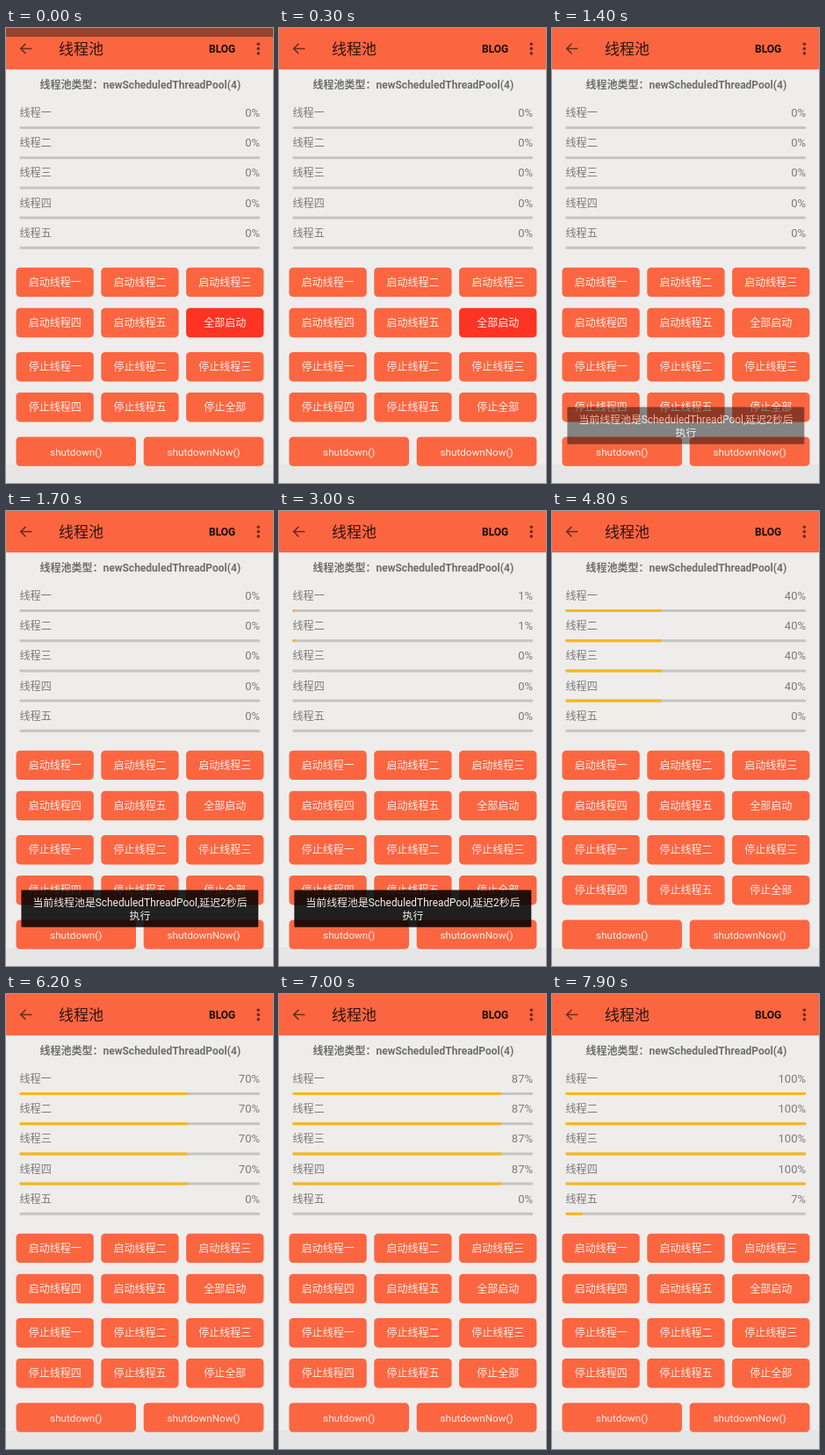
An HTML page for the animation above (8000 ms loop, 304 by 518 pixels).

```html
<!DOCTYPE html>
<html lang="zh-CN">
<head>
<meta charset="utf-8">
<style>
html, body { margin: 0; width: 100%; height: 100%; overflow: hidden; background: #eeedec; }
svg { display: block; width: 304px; height: 518px; font: 12.1px Roboto, 'Noto Sans CJK SC', 'Noto Sans CJK', sans-serif; }
.middle { text-anchor: middle; }
.bold { font-weight: 700; font-size: 12px; }
</style>
</head>
<body>
<svg id="stage" viewBox="0 0 304 518"></svg>
<script>
const LOOP = 8000, STEP = 100;
const ORANGE = '#fb6641', GREY = '#7b7b7a';
const stage = document.getElementById('stage');

function add(tag, attrs, parent = stage) {
  const el = document.createElementNS('http://www.w3.org/2000/svg', tag);
  for (const key in attrs) el.setAttribute(key, attrs[key]);
  parent.appendChild(el);
  return el;
}
const rect = (x, y, width, height, fill, rx = 0, parent) =>
  add('rect', { x, y, width, height, fill, rx }, parent);
function text(str, x, y, fill, attrs, parent) {
  const el = add('text', { x, y, fill, ...attrs }, parent);
  el.textContent = str;
  return el;
}
function button(label, x, y, width, size = 12) {
  const box = rect(x, y, width, 33.4, ORANGE, 4.5);
  text(label, x + width / 2, y + 21.4, '#ffeee8', { class: 'middle', 'font-size': size });
  return box;
}

// Background and header
rect(0, 0, 304, 518, '#eeedec');
rect(0, 497, 304, 21, '#e6e6e6');
rect(0, 0, 304, 47.2, ORANGE);
const statusShade = rect(0, 0, 304, 10, '#93442d');
add('path', { d: 'M29.5 23.5H17M22.5 17.7L16.7 23.5L22.5 29.3', fill: 'none', stroke: '#6a2d1e', 'stroke-width': 1.6 });
text('线程池', 60, 30, '#30150e', { 'font-size': 17 });
text('BLOG', 231, 28, '#1c0c08', { class: 'bold' });
for (const cy of [18.3, 23.6, 28.9]) add('circle', { cx: 287.3, cy, r: 1.8, fill: '#6a2d1e' });

text('线程池类型：newScheduledThreadPool(4)', 152.8, 69, '#6f6f6f', { class: 'middle bold' });

// Progress rows
const rows = [...'一二三四五'].map((digit, i) => {
  const y = 101 + i * 34.2;
  text('线程' + digit, 15.5, y, GREY);
  rect(15.5, y + 11, 273.5, 3, '#c4c4c3', 1);
  return {
    bar: rect(15.5, y + 11, 0, 3, '#feb70f', 1),
    label: text('0%', 289, y, GREY, { 'text-anchor': 'end', 'font-size': 13 })
  };
});

// Buttons
const labels = ['启动线程一', '启动线程二', '启动线程三', '启动线程四', '启动线程五', '全部启动',
  '停止线程一', '停止线程二', '停止线程三', '停止线程四', '停止线程五', '停止全部'];
const rowTops = [272.7, 318.8, 369, 415];
const buttons = labels.map((label, i) =>
  button(label, 11.5 + i % 3 * 96.8, rowTops[Math.floor(i / 3)], 88.3));
const startAll = buttons[5];
button('shutdown()', 11.5, 465.4, 136.5, 11.7);
button('shutdownNow()', 156.7, 465.4, 136.7, 11.7);

// Toast
const toast = add('g', { class: 'middle', 'font-size': 11.9 });
rect(17.4, 431.5, 269.9, 42.3, '#000', 1, toast).setAttribute('fill-opacity', 0.87);
text('当前线程池是ScheduledThreadPool,延迟2秒后', 152.5, 450, '#f4f4f4', {}, toast);
text('执行', 152.5, 464.5, '#f4f4f4', {}, toast);

const clamp = (v, max = 1) => Math.min(max, Math.max(0, v));

function draw(t) {
  statusShade.setAttribute('opacity', clamp(1 - t / 300));
  startAll.setAttribute('fill', t < 1300 ? '#fd3323' : ORANGE);

  const fadeIn = 1 - (1 - clamp((t - 1250) / 500)) ** 2;
  const fadeOut = clamp((t - 3013) / 500) ** 2;
  toast.setAttribute('opacity', fadeIn * (1 - fadeOut));

  // Four workers run together; the fifth waits for a free one
  const work = (t - 2953.5) * 0.0217;
  rows.forEach(({ bar, label }, i) => {
    const lag = i === 4 ? 100 : i > 1 ? 0.03 : 0;
    const percent = Math.floor(clamp(work - lag, 100));
    bar.setAttribute('width', percent * 2.735);
    label.textContent = percent + '%';
  });
}

const start = performance.now();
function tick() {
  const t = (performance.now() - start) % LOOP;
  draw(Math.floor(t / STEP) * STEP);
  requestAnimationFrame(tick);
}
tick();
</script>
</body>
</html>
```
